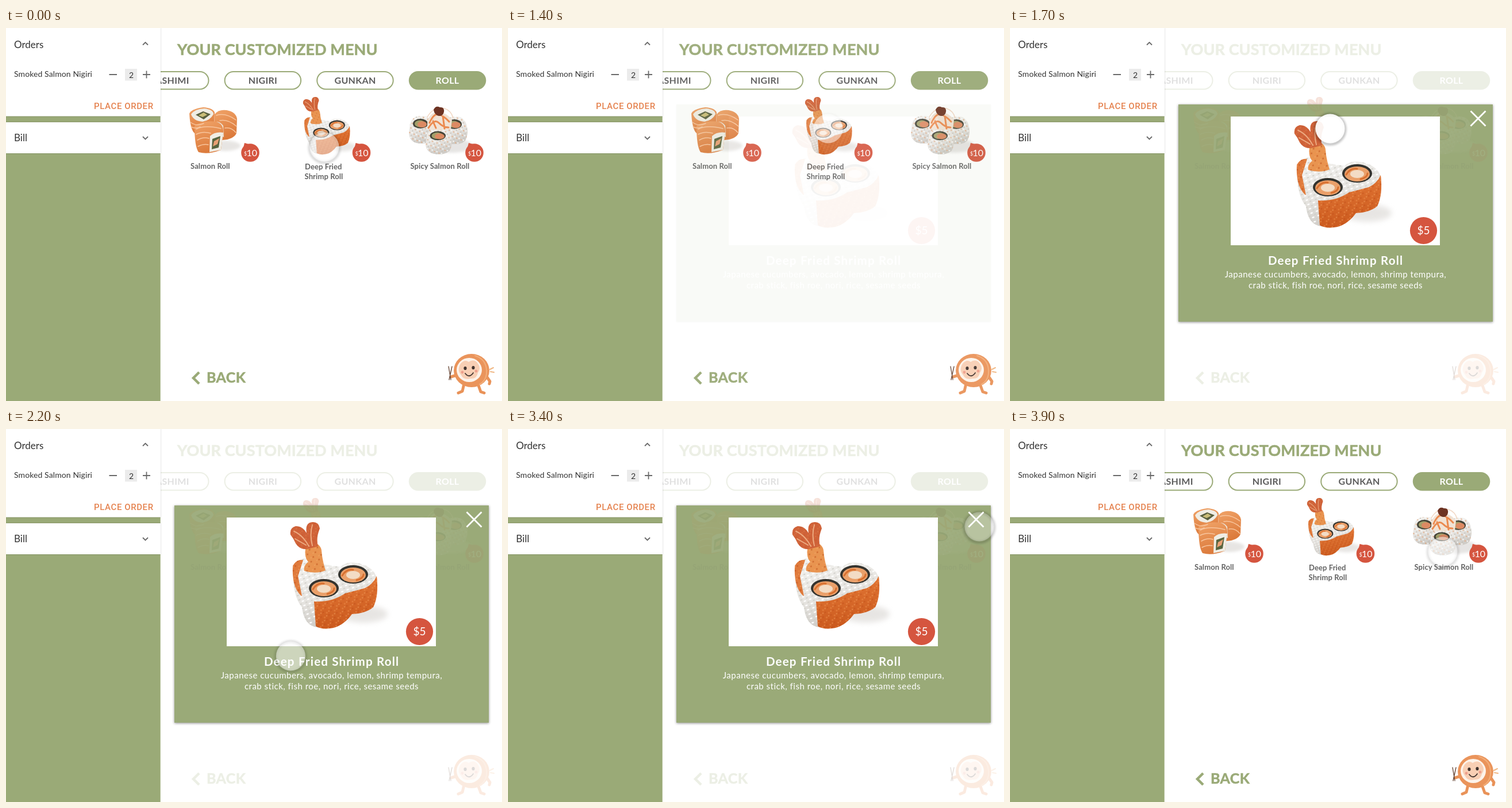
Animation of 863x649 px, one loop 4000 ms. Source, as an HTML page:

```html
<!DOCTYPE html>
<html lang="en">
<head>
<meta charset="utf-8">
<title>Customized menu</title>
<style>
html, body { margin: 0; width: 100%; height: 100%; overflow: hidden; background: #fff; }
svg { display: block; width: 100vw; height: 100vh; font-family: Lato, "Open Sans", sans-serif; }
.mid { text-anchor: middle; }
.bold { font-weight: 700; }
.head { font-weight: 700; fill: #9aaa77; stroke: #9aaa77; stroke-width: .6px; }
.line { fill: none; stroke-linecap: round; stroke-linejoin: round; }
.name { font-weight: 700; font-size: 13px; letter-spacing: .1px; fill: #626262; }
.tab { font-weight: 700; font-size: 16px; letter-spacing: .3px; text-anchor: middle; }
.card { fill: #fff; filter: drop-shadow(0 .5px 1px rgba(0,0,0,.25)); }
</style>
</head>
<body>
<svg viewBox="0 0 863 649">
<defs>
  <filter id="soft" x="-50%" y="-50%" width="200%" height="200%"><feGaussianBlur stdDeviation="2"/></filter>
  <filter id="haze" x="-50%" y="-50%" width="200%" height="200%"><feGaussianBlur stdDeviation="5"/></filter>
  <clipPath id="box"><rect x="293" y="133" width="547" height="378"/></clipPath>
  <linearGradient id="white" x2=".3" y2="1"><stop stop-color="#f4f3f0"/><stop offset=".6" stop-color="#e6e4e0"/><stop offset="1" stop-color="#cfccc7"/></linearGradient>
  <linearGradient id="fried" x2=".2" y2="1"><stop stop-color="#e57a38"/><stop offset="1" stop-color="#cb5a1e"/></linearGradient>
  <linearGradient id="fish" x2=".3" y2="1"><stop stop-color="#f0a368"/><stop offset="1" stop-color="#dc7b3c"/></linearGradient>
  <pattern id="crumb" width="11" height="9" patternUnits="userSpaceOnUse" patternTransform="rotate(24)">
    <circle cx="2" cy="2" r="1.6" fill="#f0904c"/><circle cx="7" cy="4" r="1.4" fill="#bd4c18"/><circle cx="4" cy="7" r="1.2" fill="#f5a766"/>
  </pattern>
  <pattern id="grain" width="10" height="8" patternUnits="userSpaceOnUse" patternTransform="rotate(-20)">
    <ellipse cx="3" cy="2" rx="2.4" ry="1.2" fill="#fff"/><ellipse cx="8" cy="6" rx="2" ry="1" fill="#d0cec9"/>
  </pattern>
  <pattern id="roe" width="8" height="7" patternUnits="userSpaceOnUse" patternTransform="rotate(18)">
    <circle cx="2" cy="2" r="1" fill="#e3a67c"/><circle cx="6" cy="5" r="1" fill="#c3c0b9"/><circle cx="6" cy="1" r="1" fill="#fff"/>
  </pattern>

  <path id="rice" d="M500 246Q503 229 520 225L556 236L582 240Q592 230 610 233Q640 238 646 262L636 288L598 300L584 340Q560 350 536 344Q518 338 515 310Q498 290 500 246Z"/>
  <path id="fry" d="M536 300Q566 302 590 286Q606 282 624 277Q638 271 645 256Q649 290 639 310Q626 321 602 322Q588 341 570 346Q550 350 539 343Z"/>
  <path id="side" d="M499 238Q506 226 517 228L508 256L515 291Q497 278 499 238Z"/>
  <path id="stalk" d="M523 199Q545 194 549 211Q550 228 556 246Q540 253 519 247Q517 238 526 231Q517 222 523 199Z"/>
  <path id="tail" d="M528 208Q512 212 504 199Q500 190 495 184Q493 172 504 169Q516 169 523 181Q520 163 533 162Q544 161 546 173Q539 190 543 204Z"/>
  <path id="ball" d="M3 12Q7 1 21 1Q37 0 42 12Q47 24 40 36Q30 43 14 40Q2 37 1 26Z"/>

  <g id="core">
    <ellipse cx="553" cy="277" rx="26" ry="16" fill="#34332e"/>
    <ellipse cx="553" cy="278" rx="22" ry="13" fill="#eaa06a"/>
    <ellipse cx="553" cy="278" rx="12" ry="7" fill="#f3dcc5"/>
    <path d="M534 279Q541 267 553 269M559 287Q571 284 571 277" class="line" stroke="#d9702f" stroke-width="3"/>
  </g>
  <g id="shrimp">
    <ellipse cx="622" cy="322" rx="42" ry="15" fill="#dedbd8" opacity=".7" filter="url(#haze)"/>
    <use href="#rice" fill="url(#white)"/>
    <use href="#rice" fill="url(#grain)"/>
    <use href="#side" fill="#df7a3c"/>
    <use href="#side" fill="url(#crumb)" opacity=".6"/>
    <use href="#fry" fill="url(#fried)"/>
    <use href="#fry" fill="url(#crumb)" opacity=".5"/>
    <use href="#stalk" fill="#e89450"/>
    <use href="#stalk" fill="url(#crumb)" opacity=".6"/>
    <use href="#tail" fill="#cf6239"/>
    <use href="#tail" fill="url(#crumb)" opacity=".25"/>
    <path d="M501 178Q516 184 527 204M533 167Q528 184 533 203M503 191L522 202" class="line" stroke="#edaa80" stroke-width="2"/>
    <use href="#core"/>
    <use href="#core" x="51" y="-24"/>
  </g>

  <g id="salmon">
    <ellipse cx="382" cy="205" rx="26" ry="9" fill="#dedbd8" opacity=".7" filter="url(#soft)"/>
    <path d="M319 149Q322 141 343 138Q360 139 363 147L362 172L330 184Q321 181 319 149Z" fill="url(#fish)"/>
    <path d="M322 150Q328 141 345 140Q361 142 361 150Q355 161 342 163Q326 162 322 150Z" fill="#f0ede4"/>
    <path d="M330 151L343 145L356 150L344 159Z" fill="#59603f"/>
    <path d="M335 152L344 147L350 151L342 155Z" fill="#c9bd78"/>
    <path d="M363 150Q370 141 384 143Q400 146 402 158L401 183Q396 194 376 195L362 178Z" fill="url(#fish)"/>
    <path d="M363 165Q370 160 378 170L379 190L362 180Z" fill="#ece8de"/>
    <path d="M366 172L374 172L375 184L366 180Z" fill="#6c7448"/>
    <path d="M328 170Q343 160 366 163Q379 167 378 182L374 212Q352 221 335 216Q328 206 328 170Z" fill="url(#fish)"/>
    <path d="M355 188Q364 180 378 182L374 212L354 216Z" fill="#f0ede4"/>
    <path d="M359 193L373 188L370 208L358 211Z" fill="#58643e"/>
    <path d="M362 197L371 192L368 202L360 206Z" fill="#e9a073"/>
    <path d="M321 164Q332 172 344 166M322 172Q330 176 338 172M366 152Q382 147 400 160M372 161Q386 158 401 171M381 174Q392 172 400 182M331 176Q346 168 374 175M331 185Q342 179 356 183M333 195Q343 189 353 192M334 206Q344 201 352 203" class="line" stroke="#f8c59d" stroke-width="1.5"/>
  </g>

  <g id="puff">
    <use href="#ball" fill="url(#white)"/>
    <use href="#ball" fill="url(#roe)"/>
    <ellipse cx="21" cy="12" rx="13" ry="7" fill="#454438"/>
    <ellipse cx="20" cy="12" rx="9" ry="5" fill="#a3a06a"/>
    <ellipse cx="24" cy="13" rx="8" ry="4.5" fill="#dc8a63"/>
  </g>
  <g id="spicy">
    <ellipse cx="776" cy="205" rx="36" ry="12" fill="#dcdad8" opacity=".7" filter="url(#soft)"/>
    <use href="#puff" transform="translate(700 152) scale(1 1.2)"/>
    <use href="#puff" transform="translate(759 153) scale(1 1.2)"/>
    <use href="#puff" transform="translate(729 174) scale(1.06 1.12)"/>
    <path d="M733 170Q732 153 747 146Q766 145 776 160L774 176L752 178L737 177Z" fill="#f1e3d5"/>
    <path d="M737 165Q746 145 756 151T771 163M735 174Q745 157 753 165T770 173M741 158L748 174M760 153L763 175" class="line" stroke="#eb8a4f" stroke-width="3"/>
    <path d="M733 155Q744 136 763 140Q775 144 778 157M740 163Q751 144 767 155" class="line" stroke="#f2d9c6" stroke-width="1.6"/>
    <path d="M744 142Q748 134 755 138Q763 137 762 146Q760 154 753 153Q745 151 744 142Z" fill="#6d3323"/>
  </g>

  <g id="badge">
    <path d="M-10-17L1-14L-13-5Z" fill="#d5553f"/>
    <circle r="15.8" fill="#d5553f"/>
    <text x="-11" y="5" font-size="9" fill="#fff">$</text>
    <text x="-6.5" y="5.5" font-size="16" fill="#fff">10</text>
  </g>

  <g id="dishes">
    <use href="#salmon"/>
    <use href="#shrimp" transform="translate(249.7 32.5) scale(.54)"/>
    <use href="#spicy"/>
    <use href="#badge" x="425" y="217"/>
    <use href="#badge" x="618.5" y="217"/>
    <use href="#badge" x="815" y="217"/>
    <g class="name">
      <text x="321" y="244.5">Salmon Roll</text>
      <text x="520" y="245.5">Deep Fried</text>
      <text x="519.5" y="263">Shrimp Roll</text>
      <text x="703.5" y="244.5">Spicy Salmon Roll</text>
    </g>
  </g>

  <g id="mascot">
    <g class="line" stroke="#e99258" stroke-width="5">
      <path d="M797 619L794 632L787 635M821 619L826 633L832 635M784 604L774 607M836 606L842 615L841 619"/>
    </g>
    <path d="M770 589L774 612M776 589L771 612" class="line" stroke="#6b4a3a" stroke-width="1.4"/>
    <path d="M842 594L848 591M843 598L849 599" class="line" stroke="#f0b885" stroke-width="2"/>
    <ellipse cx="810" cy="596" rx="31" ry="29" fill="#ea945b"/>
    <path d="M816 570Q838 577 836 602Q834 615 824 620" class="line" stroke="#f2ad78" stroke-width="2"/>
    <ellipse cx="806" cy="595" rx="22" ry="21" fill="#fdf3ea"/>
    <path d="M791 584Q798 576 805 581Q815 575 821 584Q827 592 821 600Q819 611 808 610Q796 613 792 604Q784 595 791 584Z" fill="#f8cfb4"/>
    <g fill="#40332e"><ellipse cx="799" cy="592" rx="2.6" ry="3.1"/><ellipse cx="813" cy="591" rx="2.6" ry="3.1"/></g>
    <g fill="#ef9f8c"><circle cx="794" cy="599" r="2.4"/><circle cx="818" cy="597" r="2.4"/></g>
    <path d="M799 601Q806 610 813 600" class="line" stroke="#40332e" stroke-width="1.8"/>
  </g>
</defs>

<rect width="863" height="649" fill="#fff"/>
<text x="298" y="47" class="head" font-size="27" letter-spacing=".1">YOUR CUSTOMIZED MENU</text>
<g id="tabs"></g>
<use href="#dishes"/>
<path d="M336 599L326 609L336 619" fill="none" stroke="#9aaa77" stroke-width="4.5"/>
<text x="349" y="617" class="head" font-size="25" letter-spacing=".4">BACK</text>
<use href="#mascot"/>

<rect id="veil" x="269" width="594" height="649" fill="#fff"/>
<g id="modal">
  <rect x="293" y="133" width="547" height="378" fill="#9aaa78" style="filter:drop-shadow(0 1px 2px rgba(0,0,0,.45))"/>
  <g clip-path="url(#box)"><use href="#dishes" opacity=".07"/></g>
  <rect x="384" y="154" width="364" height="224" fill="#fff"/>
  <use href="#shrimp"/>
  <circle cx="719.5" cy="352.5" r="23.6" fill="#d5553f"/>
  <g fill="#fff" class="mid">
    <text x="719.5" y="359" font-size="19">$5</text>
    <text x="566.6" y="412" class="bold" font-size="20.5" letter-spacing="1.2">Deep Fried Shrimp Roll</text>
    <g font-size="15" letter-spacing=".5">
      <text x="566.5" y="434">Japanese cucumbers, avocado, lemon, shrimp tempura,</text>
      <text x="566.5" y="453">crab stick, fish roe, nori, rice, sesame seeds</text>
    </g>
  </g>
</g>

<rect width="268.7" height="649" fill="#9aaa77"/>
<rect class="card" width="269" height="153.5"/>
<rect class="card" y="164" width="269" height="54"/>
<g fill="#333">
  <text x="14" y="35" font-size="17">Orders</text>
  <text x="14" y="197" font-size="17">Bill</text>
  <text x="14" y="85" font-size="14" letter-spacing=".1">Smoked Salmon Nigiri</text>
  <rect x="207" y="71" width="21" height="20.5" fill="#ebebeb"/>
  <text x="218" y="87" class="mid" font-size="14">2</text>
</g>
<text x="153" y="140.5" font-size="15" font-weight="500" letter-spacing=".6" fill="#e58350" style="font-family:Roboto,sans-serif">PLACE ORDER</text>
<path d="M238 29.5L242.5 25L247 29.5M238 189L242.5 193.5L247 189M179.5 81H193M238 81H251M244.5 74.5V87.5" fill="none" stroke="#6a6a6a" stroke-width="1.8"/>

<g id="touch">
  <circle id="ring" r="26" cy="1" fill="none" stroke="#000" stroke-width="3" filter="url(#soft)"/>
  <circle id="disc" r="25.5" fill="#fff"/>
</g>
<path id="cross" d="M801.5 144.5L827.5 170.5M827.5 144.5L801.5 170.5" stroke="#fff" stroke-width="2.8"/>
</svg>
<script>
const $ = id => document.getElementById(id);

const tabs = [["SASHIMI", 285], ["NIGIRI", 447], ["GUNKAN", 607.5], ["ROLL", 768]];
$("tabs").innerHTML = tabs.map(([label, x], i) => {
  const on = label === "ROLL", left = 220 + 160.6 * i;
  return `<rect x="${left}" y="76" width="132.5" height="30.5" rx="15.2"
    fill="${on ? "#9aaa77" : "#fff"}" stroke="#9aaa77" stroke-width="2"/>
    <text class="tab" x="${x}" y="96.5" fill="${on ? "#fff" : "#5c5c5c"}">${label}</text>`;
}).join("");

// time, x, y, disc opacity, ring opacity
const path = [
  [0, 554, 207, .5, .25],
  [600, 557, 175, .5, .15],
  [1400, 557, 175, .5, .04],
  [1700, 557, 175, .93, .4],
  [1800, 557, 175, .9, .4],
  [2300, 480, 450, .4, .2],
  [2400, 500, 460, .35, .2],
  [2600, 735, 444, .35, .2],
  [2800, 822, 260, .3, .25],
  [2900, 831, 180, .3, .25],
  [3100, 820, 170, .3, .3],
  [3400, 820, 170, .3, .3],
  [3600, 820, 170, .8, .35],
  [3700, 820, 170, .8, .35],
  [3800, 805, 180, .7, .3],
  [3900, 753, 213, .5, .2],
  [4000, 554, 207, .5, .25]
];

function touchAt(t) {
  const i = path.findIndex(k => k[0] > t), a = path[i - 1], b = path[i];
  const u = (t - a[0]) / (b[0] - a[0]);
  return a.map((v, n) => v + (b[n] - v) * u);
}

function ease(t, from, to) {
  const u = Math.min(1, Math.max(0, (t - from) / (to - from)));
  return u < .5 ? 4 * u ** 3 : 1 - 4 * (1 - u) ** 3;
}

function draw(now) {
  const t = Math.floor(now % 4000 / 100) * 100; // ten pictures a second
  const open = ease(t, 1300, 1700) - ease(t, 3400, 3720);
  $("modal").style.opacity = $("cross").style.opacity = open;
  $("veil").style.opacity = .81 * open;
  const [, x, y, disc, ring] = touchAt(t);
  $("touch").setAttribute("transform", `translate(${x} ${y})`);
  $("disc").style.opacity = disc;
  $("ring").style.opacity = ring;
}

let start;
function loop(now) {
  start ??= now;
  draw(now - start);
  requestAnimationFrame(loop);
}
draw(0);
requestAnimationFrame(loop);
</script>
</body>
</html>
```
